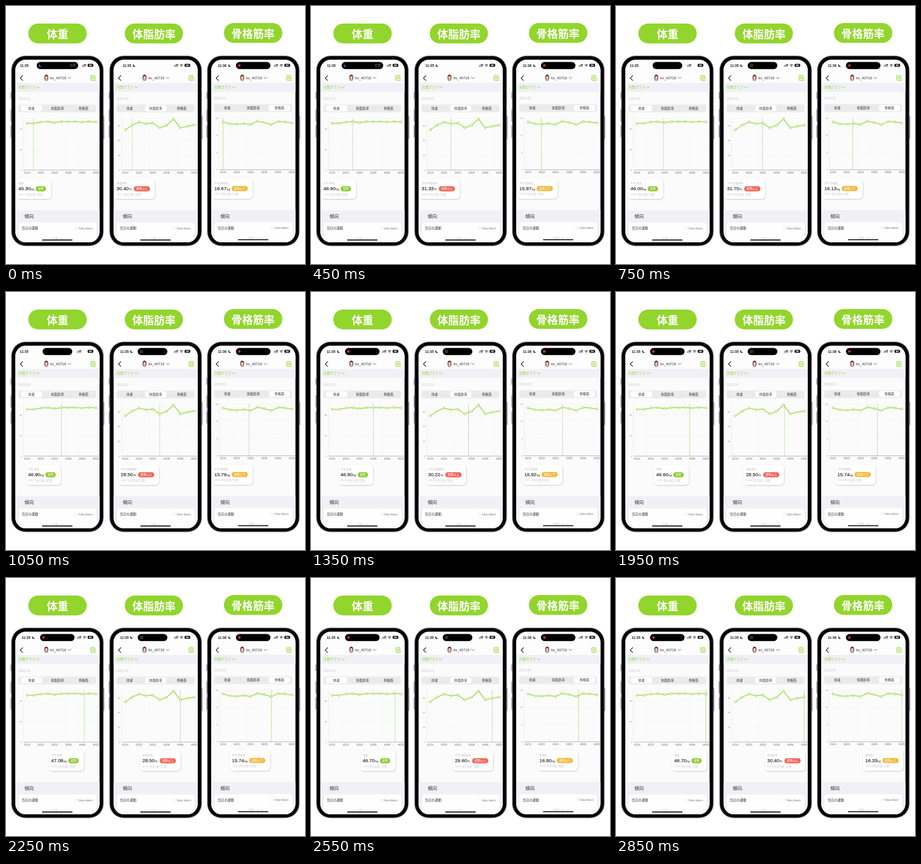
An HTML page for the animation above (3000 ms loop, 580x500 px).

```html
<!DOCTYPE html>
<html lang="ja">
<head>
<meta charset="utf-8">
<title>体重グラフ</title>
<style>
html, body { margin: 0; width: 100%; height: 100%; overflow: hidden; background: #fff; }
svg { display: block; width: 580px; height: 500px; }
text { font-family: "Liberation Sans", "Noto Sans CJK JP", "Noto Sans CJK", sans-serif; }
.jp { font-family: "Noto Sans CJK JP", "Noto Sans CJK", sans-serif; }
.mid { text-anchor: middle; }
.end { text-anchor: end; }
</style>
</head>
<body>
<svg id="stage" viewBox="0 0 580 500" xmlns="http://www.w3.org/2000/svg">
  <defs>
    <clipPath id="screen"><rect x="18" y="104" width="163.5" height="354" rx="20.5"/></clipPath>
    <filter id="shadow" x="-20%" y="-25%" width="140%" height="160%">
      <feDropShadow dx="0.6" dy="1" stdDeviation="1.3" flood-color="#000" flood-opacity=".24"/>
    </filter>
  </defs>
</svg>
<script>
const LOOP = 3000, STEP = 150;
const GREEN = '#8fd42b', SOFT = '#a0d850', PALE = '#b4df7c', GREY = '#bfc2bd', OLIVE = '#b3c795';
const DATES = ['01/14', '02/17', '02/23', '02/24', '03/23', '03/27', '03/28', '03/31', '04/06', '04/24', '04/25'];
const COUNTS = [6, 1, 2, 2, 5, 3, 5, 2, 1, 4, 1];
const FIRST = 41, GAP = 13.34, AXIS = 318;

// scrub: [step, line x, card x, line colour]; status: [step, clock x, moon x, island]
const PHONES = [
  { dx: 0, dy: 0, clock: '11:35', battery: 158.3, perUnit: 2, ticks: [40, 20, 0],
    title: '体重', pill: [43.3, 34, 113.3], titleAt: [100, 62.4], tab: 0,
    name: '体重', unit: 'kg', grade: '標準', tint: '#8fcb33', cardW: 67.5,
    values: [45.3, 45.3, 46.6, 46.9, 46, 46.9, 46.9, 47.1, 46.6, 47.08, 46.7],
    scrub: [[0, 53, 20, PALE], [3, 81, 20, GREY], [5, 92, 24, GREY], [7, 107.7, 38.8, OLIVE],
      [9, 121, 53, GREY], [11, 134.5, 64, SOFT], [15, 151.7, 83.3, PALE], [19, 174.4, 108.7, SOFT]],
    status: [[0, 27, 0, 'wide'], [1, 31, 0, 'wide'], [5, 26.8, 0, 'plain'], [8, 30.4, 53.5, 'red']] },
  { dx: 190.5, dy: 0, clock: '11:35', battery: 155.8, perUnit: 2.87, ticks: [30, 20, 10, 0],
    title: '体脂肪率', pill: [230.4, 34, 112.8], titleAt: [287, 61.6], tab: 1,
    name: '体脂肪率', unit: '%', grade: '標準以上', tint: '#f1665a', cardW: 78,
    values: [27.2, 30.4, 32.4, 31.33, 31.7, 28.5, 30.22, 34.5, 28.5, 29.6, 30.4],
    scrub: [[0, 54.5, 19.8, PALE], [3, 81, 19.8, GREY], [6, 100, 21, GREY], [7, 107.7, 28, PALE],
      [9, 115, 32.5, OLIVE], [11, 125.7, 44.7, PALE], [15, 147.7, 70, OLIVE], [19, 174.4, 98.7, SOFT]],
    status: [[0, 35.7, 58.5, 'none'], [1, 31.4, 54.3, 'none'], [5, 30.8, 53.3, 'ring']] },
  { dx: 380, dy: -.6, clock: '11:36', battery: 160, perUnit: 5.56, ticks: [18, 12, 6, 0],
    title: '骨格筋率', pill: [422.7, 33, 113.3], titleAt: [479, 60.6], tab: 2,
    name: '骨格筋', unit: 'kg', grade: '標準以下', tint: '#f4b942', cardW: 78.5,
    values: [16.67, 16, 15.87, 16.13, 15.79, 16.92, 16.46, 15.74, 16.8, 16.7, 16.33],
    scrub: [[0, 41, 20, SOFT], [3, 67, 20, SOFT], [7, 91.6, 20, GREY], [8, 99, 20, GREY], [9, 107.7, 29.5, GREY],
      [11, 119, 36.3, OLIVE], [15, 135, 54, SOFT], [17, 139, 59, SOFT], [18, 168, 92, PALE], [19, 174.4, 99.2, PALE]],
    status: [[0, 31, 54, 'red']] }
];

const ISLANDS = { wide: [59.5, 80.5], plain: [71, 57.5], red: [66, 67], ring: [65, 57.5] };

const rect = (x, y, w, h, r, fill, more = '') =>
  `<rect x="${x}" y="${y}" width="${w}" height="${h}" rx="${r}" fill="${fill}" ${more}/>`;
const text = (x, y, size, fill, s, cls = '', more = '') =>
  `<text x="${x}" y="${y}" font-size="${size}" fill="${fill}" class="${cls}" ${more}>${s}</text>`;
const line = (x1, y1, x2, y2, color, w, more = '') =>
  `<path d="M${x1} ${y1}L${x2} ${y2}" stroke="${color}" stroke-width="${w}" ${more}/>`;
const stroke = (d, color, w) =>
  `<path d="${d}" fill="none" stroke="${color}" stroke-width="${w}" stroke-linecap="round" stroke-linejoin="round"/>`;
const dot = (x, y, r, fill, more = '') => `<circle cx="${x}" cy="${y}" r="${r}" fill="${fill}" ${more}/>`;
const moon = (x, fill) =>
  `<path d="M${x - .6} 112.4a2.9 2.9 0 1 0 3.3 4.1a2.7 2.7 0 0 1 -3.3 -4.1z" fill="${fill}"/>`;

function body() {
  const side = '#6d6775';
  const buttons = [[9, 167, 13], [9, 200, 24], [9, 231, 24], [187.5, 213, 45]];
  return buttons.map(([x, y, h]) => rect(x, y, 3, h, 1, side)).join('') +
    rect(10, 96, 179.5, 369.5, 28, '#9a93a2') +
    rect(10.9, 96.9, 177.7, 367.7, 27.1, '#2a272f') +
    rect(11.9, 97.9, 175.7, 365.7, 26.1, '#030304');
}

function header() {
  return rect(18, 104, 164, 45, 0, '#fdfdfe') +
    stroke('M32.3 135L27.6 139.7L32.3 144.4', '#222', 1.3) +
    '<path d="M74.9 142.6c-1-5.8 0-9.6 3.3-9.6s4.3 3.800 3.300 9.600z" fill="#4a2b27"/>' +
    '<path d="M75 145c0-2 1.600-2.600 3.200-2.600s3.200.6 3.200 2.600z" fill="#d98a85"/>' +
    '<ellipse cx="78.200" cy="138.900" rx="2.500" ry="3.500" fill="#f2c3ae"/>' +
    text(86, 142.1, 7.1, '#333', 'kv_40716') +
    stroke('M120.4 138L123.4 140.8L126.4 138', '#555', .9) +
    rect(164.6, 134.6, 8, 9.8, 1, '#f2fbe4', `stroke="${GREEN}" stroke-width="1"`) +
    stroke('M166.6 137.3H170.8M166.6 139.5H170.8M166.6 141.7H168.6', GREEN, .8) +
    dot(172.4, 142.8, 2.1, '#fff', `stroke="${GREEN}" stroke-width=".9"`) +
    rect(18, 149, 164, 17.5, 0, '#f0f0f6') +
    text(24, 159.7, 6.5, GREEN, '月間グラフ', 'jp') +
    stroke('M58.8 156.3L61.8 159L64.8 156.3', GREEN, 1);
}

function tabs(active) {
  const names = ['体重', '体脂肪率', '骨格筋'];
  return rect(24, 191, 151, 15, 4, '#ebebec') +
    [74.5, 125].map(x => line(x, 195, x, 202, '#d9d9db', .5)).join('') +
    rect(29 + active * 50.5, 192.6, 41, 11.4, 3.5, '#fff') +
    names.map((s, i) => text(49.3 + i * 50.5, 200.7, 6.4, '#3c3c3c', s, 'jp mid')).join('');
}

function chart(p) {
  const px = i => FIRST + i * GAP, py = v => AXIS - v * p.perUnit;
  let s = '';
  for (let i = 1; i < 11; i += 2) s += line(px(i) + 6.6, 217, px(i) + 6.6, AXIS, '#f0f0f1', .5, 'stroke-dasharray="1.5 1"');
  for (const v of p.ticks) {
    if (v) s += line(34, py(v), 181, py(v), '#f0f0f1', .6);
    s += text(31, py(v) + 1.6, 4.3, '#888', v, 'end');
  }
  s += line(34, 217, 34, AXIS, '#e2e2e4', .6) + line(34, AXIS, 182, AXIS, '#97979c', .8);
  for (let i = 0; i < 11; i += 2)
    s += line(px(i), AXIS, px(i), AXIS + 1.5, '#97979c', .5) + text(px(i), 324.8, 4.8, '#666', DATES[i], 'mid');
  s += `<path data-k="mark" d="M0 217V${AXIS}" stroke-width=".8"/>`;
  s += stroke('M' + p.values.map((v, i) => `${px(i)} ${py(v)}`).join('L'), GREEN, 1.3);
  return s + p.values.map((v, i) => dot(px(i), py(v), 2, '#fff', `stroke="${GREEN}" stroke-width="1"`)).join('');
}

function card(p) {
  const pillW = p.grade.length > 2 ? 31.5 : 20;
  return `<g data-k="card">${rect(0, 335, p.cardW, 39, 7, '#fff', 'filter="url(#shadow)"')}` +
    text(4.3, 345.3, 5, '#bdbdbf', '', 'jp', 'data-k="label"') +
    `<text x="4.3" y="357.3" font-size="9.4" fill="#222" stroke="#222" stroke-width=".2"><tspan data-k="value"></tspan><tspan font-size="6" stroke-width="0" dx=".4">${p.unit}</tspan></text>` +
    rect(37.6, 349.3, pillW, 10, 5, p.tint) +
    text(37.6 + pillW / 2, 356.3, 5.6, '#fff', p.grade, 'jp mid', 'font-weight="500"') +
    text(4.3, 367, 4.9, '#c9c9cc', '', '', 'data-k="date"') + '</g>';
}

function footer() {
  return rect(18, 396, 164, 62, 0, '#f0f0f6') +
    text(36, 411.2, 9, '#333', '傾向', 'jp') +
    rect(24.5, 419.5, 151, 44, 5, '#fefefe') +
    text(30, 433.4, 6.5, '#333', '当日の運動', 'jp') +
    dot(136, 430.8, 2.3, '#fff', 'stroke="#dedee0" stroke-width=".7"') +
    text(140.3, 432.5, 5.1, '#777', 'Tolba Watch') +
    text(104, 453.6, 6.5, '#c3d3bb', '活動&#160;&#160;&#160;Kcal', 'jp mid') +
    rect(18, 454.5, 164, 4, 0, '#fcfcfd') +
    rect(70, 452.6, 59, 1.8, .9, '#111');
}

function status(p, [, clockX, moonX, kind]) {
  const b = p.battery, wide = kind === 'wide', ink = '#1b1b1b';
  const sx = wide ? b - 11 : b - 20.5;
  let s = text(clockX, 117.6, 6.7, ink, p.clock, '', 'font-weight="bold"');
  if (kind in ISLANDS) s += rect(ISLANDS[kind][0], 108.5, ISLANDS[kind][1], 13.8, 6.9, '#000');
  if (moonX) s += moon(moonX, ink);
  if (wide) s += moon(66.5, '#6c63e0') + text(124, 117.3, 5.4, '#a5a5a8', '打开', 'jp');
  if (kind === 'red') s += dot(72.7, 115.3, 2.3, '#d93a30');
  if (kind === 'ring') s += dot(72.5, 115.2, 2.7, 'none', 'stroke="#9c5a26" stroke-width=".9"') + dot(72.5, 115.2, 1, '#9c5a26');
  for (let i = 0; i < 4; i++)
    s += rect(sx + i * 2.1, 114.7 - i * .8, 1.4, 1 + i * .8, .3, ink) + rect(sx + i * 2.1, 116.7, 1.4, 1.1, .3, ink);
  if (!wide && kind !== 'plain') {
    const w = b - 6;
    s += stroke(`M${w - 2.7} 114.1q2.7-2.5 5.4 0M${w - 1.5} 115.7q1.5-1.3 3 0`, ink, 1) + dot(w, 117, .8, ink);
  }
  return s + rect(b, 112, 11, 6, 2, ink) + rect(b + 11.4, 114, .8, 2, .4, '#999') +
    text(b + 5.5, 116.8, 4.9, '#fff', '96', 'mid', 'font-weight="bold"');
}

const stage = document.getElementById('stage');
for (const p of PHONES) {
  const [x, y, w] = p.pill;
  const g = document.createElementNS(stage.namespaceURI, 'g');
  g.innerHTML = rect(x, y, w, 38.5, 19.2, '#92d52d') +
    text(...p.titleAt, 21, '#fff', p.title, 'jp mid', 'font-weight="900"') +
    `<g transform="translate(${p.dx} 0)">${body()}<g clip-path="url(#screen)">` +
    rect(18, 104, 164, 354, 0, '#fbfbfc') + header() + '<g data-k="status"></g>' +
    `<g transform="translate(0 ${p.dy})">` +
    text(24, 181.7, 6.4, '#c9c9cd', '', '', 'data-k="month"') +
    tabs(p.tab) + chart(p) + footer() + card(p) + '</g></g></g>';
  stage.append(g);
  p.el = {};
  g.querySelectorAll('[data-k]').forEach(e => p.el[e.dataset.k] = e);
}

const last = (rows, n) => rows.findLastIndex(r => r[0] <= n);

function pose(p, n) {
  const i = last(p.scrub, n), a = p.scrub[i], b = p.scrub[i + 1] || a;
  const k = b === a ? 0 : (n - a[0]) / (b[0] - a[0]);
  const mix = j => a[j] + (b[j] - a[j]) * k;
  const x = mix(1);
  // The readout belongs to the point the line is moving to.
  const at = Math.min(10, Math.max(0, Math.ceil((x - FIRST) / GAP - .08)));
  const el = p.el;
  el.mark.setAttribute('transform', `translate(${x} 0)`);
  el.mark.setAttribute('stroke', a[3]);
  el.card.setAttribute('transform', `translate(${mix(2)} 0)`);
  el.label.textContent = (COUNTS[at] > 1 ? '平均 ' : '') + p.name;
  el.value.textContent = p.values[at].toFixed(2);
  el.date.textContent = `${DATES[at]} 測定回数 ${COUNTS[at]}回数`;
  el.month.textContent = '2023.' + DATES[at].slice(0, 2);
  el.status.innerHTML = status(p, p.status[last(p.status, n)]);
}

let shown = -1;
const start = performance.now();
function tick(now) {
  const n = Math.floor((Math.max(0, now - start) % LOOP) / STEP);
  if (n !== shown) PHONES.forEach(p => pose(p, n));
  shown = n;
  requestAnimationFrame(tick);
}
tick(start);
</script>
</body>
</html>
```
